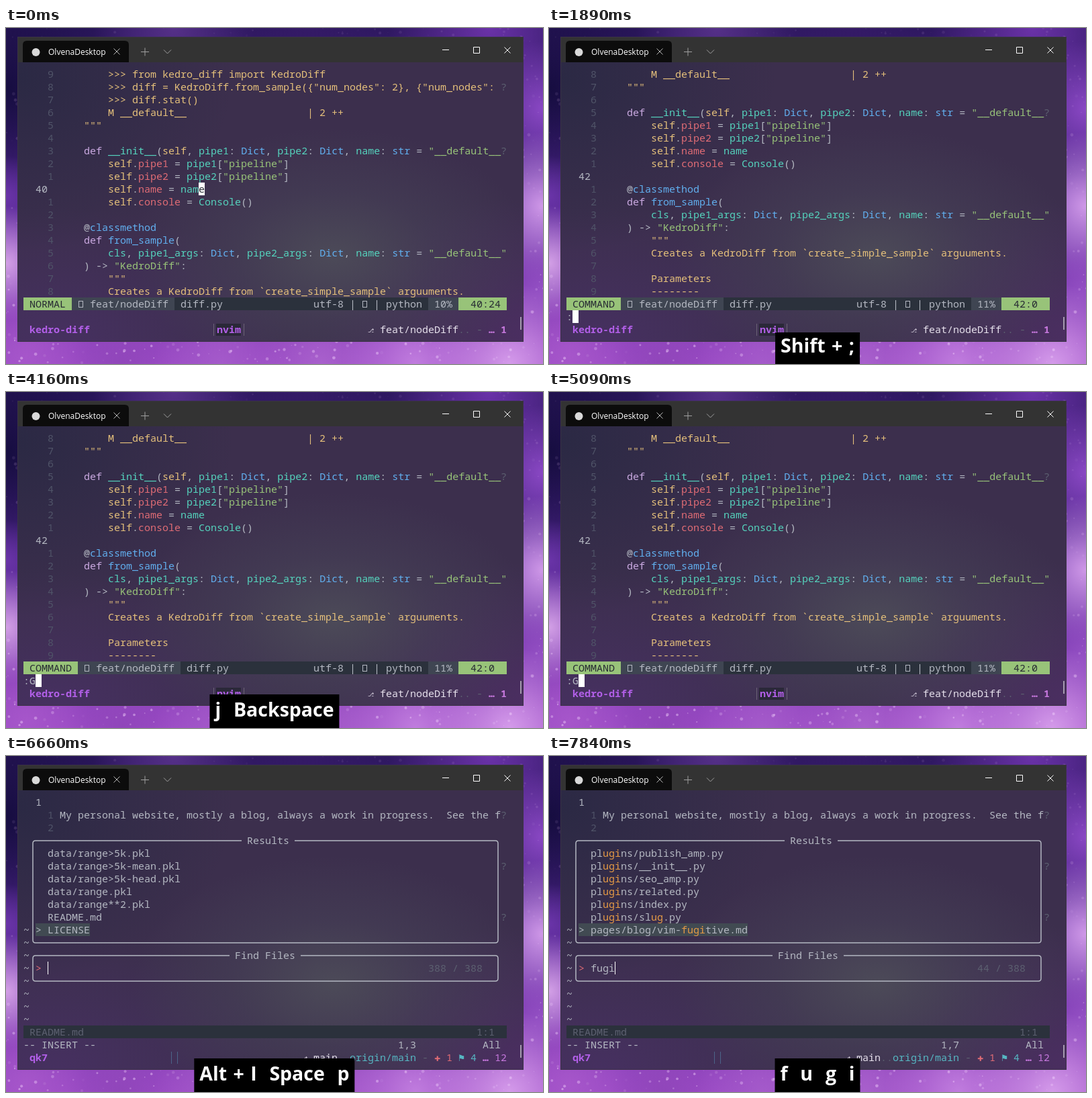
Animation of 800 by 500 pixels, one loop 8000 ms. Source, as an HTML page with a canvas:

```html
<!DOCTYPE html>
<html lang="en">
<head>
<meta charset="utf-8">
<title>Terminal session</title>
<style>
html, body { margin: 0; width: 100%; height: 100%; overflow: hidden; background: #241252; }
#stage { position: relative; width: 800px; height: 500px; overflow: hidden; }
#sky, #chrome { position: absolute; left: 0; top: 0; }
#window {
  position: absolute; left: 18px; top: 14px; width: 752px; height: 452px;
  box-shadow: 0 0 0 1px #3a3344;
  background:
    radial-gradient(ellipse 300px 190px at 470px 325px, #4c4a58 0%, #48445880 50%, transparent),
    radial-gradient(ellipse 320px 260px at 0 60px, #2b2944, transparent),
    radial-gradient(ellipse 300px 200px at 752px 440px, #4a2e60, transparent),
    radial-gradient(ellipse 340px 200px at 60px 452px, #463060, transparent),
    #3c2f4d;
}
#screen span, #screen i { position: absolute; }
#screen span {
  height: 19px; white-space: pre;
  font: 500 15px/19px "Noto Sans Mono", "DejaVu Sans Mono", monospace;
  font-variant-ligatures: none; color: #b4b8c2;
}
#screen b { font-weight: 500; }
#screen span.bold { font-weight: 700; }
#screen .y { color: #e5c07b; } #screen .g { color: #98c379; } #screen .r { color: #e06c75; }
#screen .t { color: #55d3bd; } #screen .u { color: #61afef; } #screen .l { color: #cbaae2; }
#screen .o { color: #e59a45; } #screen .dim { color: #5c6070; } #screen .num { color: #505468; }
#screen .p { color: #b25fe8; } #screen .m { color: #c678dd; } #screen .c { color: #56b6c2; }
#screen .w { color: #e6e0ec; } #screen .dark { color: #282c34; }
#screen .small { font-size: 8px; line-height: 22px; }
#keys {
  position: absolute; bottom: 0; left: 50%; transform: translateX(-50%);
  box-sizing: border-box; height: 47px; padding: 0 8px; overflow: hidden;
  background: #000; color: #fff; white-space: pre; word-spacing: 2px;
  font: 700 28.5px/38px "Open Sans", "Noto Sans", sans-serif;
}
#keys.tall { height: 50px; line-height: 44px; }
#keys:empty { display: none; }
</style>
</head>
<body>
<div id="stage">
  <canvas id="sky" width="800" height="500"></canvas>
  <div id="window"></div>
  <svg id="chrome" width="800" height="500" fill="none" stroke="#d0d0d0">
    <path d="M18 14H770V51H18Z" fill="#333333" stroke="none"/>
    <path d="M25 51V25Q25 19 31 19H177Q183 19 183 25V51Z" fill="#0c0c0c" stroke="none"/>
    <circle cx="44.500" cy="36" r="6" fill="#d9d9d9" stroke="none"/>
    <text x="63" y="40" fill="#fff" stroke="none" font-size="12" font-family="Open Sans, Noto Sans, sans-serif">OlvenaDesktop</text>
    <path d="M160.500 30.500l9 9m0-9l-9 9" stroke="#b8b8b8"/>
    <path d="M201 35.500h12m-6-6v12M235 32.500l5.500 5.500 5.500-5.500" stroke="#a0a0a0"/>
    <path d="M650 32.500h10M696.500 28.500h9v9h-9zM742.500 28.500l9 9m0-9l-9 9" stroke="#fff"/>
    <path d="M767 430V449" stroke="#a39aac" stroke-width="2"/>
  </svg>
  <div id="screen"></div>
  <div id="keys"></div>
</div>
<script>
const LOOP = 8000, CW = 9, RH = 19, X0 = 26, Y0 = 59;
const screenEl = document.getElementById('screen');
const keysEl = document.getElementById('keys');

// Soft nebula behind the window: x, y, radius, colour
function paintSky() {
  const g = document.getElementById('sky').getContext('2d');
  const base = g.createLinearGradient(0, 0, 0, 500);
  base.addColorStop(0, '#2e1860');
  base.addColorStop(.5, '#5b2a9c');
  base.addColorStop(1, '#9a4ac4');
  g.fillStyle = base;
  g.fillRect(0, 0, 800, 500);
  const clouds = [
    [0, 90, 210, '#160d40'], [250, 0, 120, '#553088'], [450, 0, 110, '#341a66'],
    [720, 0, 150, '#6a32a8'], [800, 120, 100, '#8a48c4'], [800, 265, 110, '#cf98e8'],
    [800, 390, 70, '#9450c4'], [0, 250, 60, '#6a34a8'], [0, 350, 85, '#d3a0e6'],
    [30, 490, 100, '#a656ca'], [170, 500, 80, '#9046ba'], [320, 500, 100, '#a45aca'],
    [470, 500, 100, '#a860cc'], [610, 500, 110, '#c07cde'], [750, 500, 120, '#d49aea']
  ];
  for (const [x, y, r, color] of clouds) {
    const blob = g.createRadialGradient(x, y, 0, x, y, r);
    blob.addColorStop(0, color);
    blob.addColorStop(1, color + '00');
    g.fillStyle = blob;
    g.fillRect(0, 0, 800, 500);
  }
  let seed = 7;
  const rnd = () => (seed = seed * 16807 % 2147483647) / 2147483647;
  for (let i = 0; i < 1500; i++) {
    const x = rnd() * 800, y = rnd() * 500;
    g.fillStyle = `rgba(240,205,250,${rnd() * (.1 + y / 1200)})`;
    g.beginPath();
    g.arc(x, y, .5 + rnd() * 2, 0, 7);
    g.fill();
  }
}

const FIRST = 31;
const SOURCE = `        >>> from kedro_diff import KedroDiff
        >>> diff = KedroDiff.from_sample({"num_nodes": 2}, {"num_nodes": 4})
        >>> diff.stat()
        M __default__                    | 2 ++
    """

    def __init__(self, pipe1: Dict, pipe2: Dict, name: str = "__default__"):
        self.pipe1 = pipe1["pipeline"]
        self.pipe2 = pipe2["pipeline"]
        self.name = name
        self.console = Console()

    @classmethod
    def from_sample(
        cls, pipe1_args: Dict, pipe2_args: Dict, name: str = "__default__"
    ) -> "KedroDiff":
        """
        Creates a KedroDiff from \`create_simple_sample\` arguuments.

        Parameters
        --------`.split('\n');

const README = ['',
  'My personal website, mostly a blog, always a work in progress.  See the full story', '',
  '## Setup', '',
  'Create a fresh environment, install the requirements, and then start the local server', '',
  '## Build', '',
  'Every push to the main branch builds all of the pages and then publishes the new site'];

const FILES = {
  '': ['data/range>5k.pkl', 'data/range>5k-mean.pkl', 'data/range>5k-head.pkl',
    'data/range.pkl', 'data/range**2.pkl', 'README.md', 'LICENSE'],
  f: ['pages/blog/refactor.md', 'pages/blog/find-files.md', 'pages/blog/fugitive.md',
    'static/fonts.css', 'static/favicon.ico', 'static/feed.xml', 'Pipfile'],
  fu: ['pages/blog/useful.md', 'pages/blog/functions.md', 'pages/blog/fuzzy.md',
    'pages/blog/full-text.md', 'pages/blog/vim-fu.md', 'plugins/slug.py', 'pages/blog/vim-fugitive.md'],
  fugi: ['plugins/publish_amp.py', 'plugins/__init__.py', 'plugins/seo_amp.py',
    'plugins/related.py', 'plugins/index.py', 'plugins/slug.py', 'pages/blog/vim-fugitive.md']
};
FILES.fug = FILES.fugi;
const COUNTS = { '': 388, f: 203, fu: 96, fug: 47, fugi: 44 };
const MATCH = { f: /f/g, fu: /fu/g, fug: /fug|ug/g, fugi: /fugi|ugi|ug/g };

const esc = s => s.replace(/&/g, '&amp;').replace(/</g, '&lt;');
const tag = (cls, s) => `<b class="${cls}">${esc(s)}</b>`;
const span = (col, row, html, cls = '') =>
  `<span class="${cls}" style="left:${X0 + col * CW}px;top:${Y0 + row * RH}px">${html}</span>`;
const put = (col, row, text, cls) => span(col, row, esc(text), cls);
const rect = (x, y, w, h, color) =>
  `<i style="left:${x}px;top:${y}px;width:${w}px;height:${h}px;background:${color}"></i>`;
const fill = (col, row, cols, color) => rect(X0 + col * CW, Y0 + row * RH, cols * CW, RH, color);
const tofu = (col, row) =>
  `<i style="left:${X0 + col * CW + 1}px;top:${Y0 + row * RH + 5}px;width:5px;height:8px;border:1px solid #b4b8c2"></i>`;

function highlight(code) {
  const token = /(?<g>"[^"]*"?)|\b(?<l>def)\b|\b(?<y>self)\b|(?<r>(?<=self\.)\w+)|\b(?<u>Dict|str|classmethod|from_sample)\b|(?<t>\w+)/g;
  let out = '', last = 0;
  for (const m of code.matchAll(token)) {
    const cls = Object.keys(m.groups).find(name => m.groups[name]);
    out += esc(code.slice(last, m.index)) + tag(cls, m[0]);
    last = m.index + m[0].length;
  }
  return out + esc(code.slice(last));
}

// Lines too long for the 74 text columns end in a marker.
const clip = line => line.length > 74 ? line.slice(0, 73) : line;
const overflow = (row, line) => line.length > 74 ? put(79, row, '?', 'dim') : '';

let inDoc = true;
const CODE = SOURCE.map(line => {
  const quotes = line.includes('"""');
  const html = inDoc || quotes ? tag('y', clip(line)) : highlight(clip(line));
  if (quotes) inDoc = !inDoc;
  return html;
});

function gutter(row, current, number) {
  return row === current
    ? put(2, row, String(number))
    : put(4, row, String(Math.abs(row - current)), 'num');
}

function codeRows(s) {
  let out = '';
  for (let row = 0; row < 18; row++) {
    const index = row + s.scroll;
    out += gutter(row, s.line - FIRST - s.scroll, s.line) +
      span(6, row, CODE[index]) + overflow(row, SOURCE[index]);
  }
  return out;
}

function readmeRows(covered) {
  let out = '';
  for (let row = 0; row < 18; row++) {
    if (row >= README.length) { out += put(0, row, '~'); continue; }
    out += overflow(row, README[row]);
    if (!covered || row < 3) out += gutter(row, 0, 1) + put(6, row, clip(README[row]));
  }
  return out;
}

function statusLine(mode, branch, file, type, percent, pos) {
  const a = mode.length + 2, b = branch.length + 4;
  return fill(0, 18, 80, '#2b313c') + fill(0, 18, a, '#98c379') + fill(a, 18, b, '#3f4552') +
    fill(67, 18, 5, '#3f4552') + fill(72, 18, 8, '#98c379') +
    put(1, 18, mode, 'dark') + tofu(a + 1, 18) + put(a + 3, 18, branch) + put(a + b + 1, 18, file) +
    put(67 - type.length - 13, 18, 'utf-8 |') + tofu(67 - type.length - 5, 18) +
    put(67 - type.length - 3, 18, '| ' + type) + put(68, 18, percent) + put(74, 18, pos, 'dark');
}

const bars = (color, ...cols) =>
  cols.map(c => rect(X0 + c * CW + 4, 440, 1, 18, color)).join('');

function tmuxLine(s) {
  let out = put(1, 20, s.blog ? 'qk7' : 'kedro-diff', 'p bold');
  if (!s.blog) {
    out += bars('#6b6376', 31, 36) + rect(313, 440, 37, 18, '#2a2838') + put(32, 20, 'nvim', 'p bold');
  } else {
    out += s.tmux ? bars('#4c6488', 24, 25) : bars('#4c6488', 30, 31);
  }
  if (!s.tmux) {
    return out + put(57, 20, '⎇', 'w small') + put(59, 20, 'feat/nodeDiff', 'w') +
      put(72, 20, '.. -', 'dim') + put(77, 20, '…', 'm bold') + put(79, 20, '1', 'm bold');
  }
  return out + put(46, 20, '⎇', 'w small') + put(48, 20, 'main', 'w') + put(52, 20, '..', 'dim') +
    put(54, 20, 'origin/main', 'c') + put(66, 20, '-', 'dim') +
    put(68, 20, '✚', 'r') + put(70, 20, '1', 'r') + put(72, 20, '⚑', 'c') +
    put(74, 20, '4', 'c') + put(76, 20, '…', 'm bold') + put(78, 20, '12', 'm');
}

function frame(top, bottom, gapStart, gapEnd) {
  return `M${gapStart} ${top}H44Q40 ${top} 40 ${top + 4}V${bottom - 4}Q40 ${bottom} 44 ${bottom}` +
    `H729Q733 ${bottom} 733 ${bottom - 4}V${top + 4}Q733 ${top} 729 ${top}H${gapEnd}`;
}

function finder(s) {
  let out = '<svg width="800" height="500" style="position:absolute;left:0;top:0" fill="none" ' +
    `stroke="#b4b8c2" stroke-width="1.500"><path d="${frame(126, 278, 351, 430)}${frame(297, 335, 333, 439)}"/></svg>` +
    put(37, 3, 'Results') + put(35, 12, 'Find Files');
  const files = s.listed === undefined ? [] : FILES[s.listed];
  files.forEach((name, i) => {
    const row = 4 + i;
    if (i === 6) out += fill(2, row, name.length + 2, '#414a52') + put(2, row, '>');
    const html = s.listed ? esc(name).replace(MATCH[s.listed], m => tag('o', m)) : esc(name);
    out += span(4, row, html);
  });
  const count = s.listed === undefined ? '0 / 0' : COUNTS[s.listed] + ' / 388';
  return out + put(2, 13, '>', 'r') + put(4, 13, s.query) +
    rect(X0 + (4 + s.query.length) * CW, 306, 1, 19, '#fff') +
    put(76 - count.length, 13, count, 'dim') +
    fill(0, 18, 80, '#2b313c') + put(1, 18, 'README.md', 'dim') + put(75, 18, '1:1', 'dim') +
    put(0, 19, '-- INSERT --') + put(62, 19, '1,' + (3 + s.query.length)) + put(76, 19, 'All');
}

function blockCursor(col, row, char = '') {
  return fill(col, row, 1, '#fff') + put(col, row, char, 'dark');
}

function draw(s) {
  const finding = s.query !== undefined;
  let out = s.blog ? readmeRows(finding) : codeRows(s);
  if (finding) {
    out += finder(s);
  } else if (s.blog) {
    out += blockCursor(6, 0) + statusLine('NORMAL', 'main', 'README.md', 'markdown', '10%', '1:1') +
      put(69, 19, s.pending || '');
  } else {
    const command = s.cmd !== undefined;
    out += statusLine(command ? 'COMMAND' : 'NORMAL', 'feat/nodeDiff', 'diff.py', 'python', s.percent, s.pos);
    out += command
      ? put(0, 19, s.cmd) + blockCursor(s.cmd.length, 19)
      : blockCursor(s.col, s.line - FIRST - s.scroll, s.char);
  }
  screenEl.innerHTML = out + tmuxLine(s);
  keysEl.textContent = s.keys;
  keysEl.classList.toggle('tall', /[jgp]/.test(s.keys));
}

// Each step changes part of the state from its time on.
const STEPS = [
  [0, { line: 40, scroll: 0, col: 29, char: 'e', percent: '10%', pos: '40:24', keys: '' }],
  [500, { line: 41, scroll: 1, char: 'C', pos: '41:24', keys: 'j' }],
  [670, { line: 42, scroll: 2, col: 6, char: '', percent: '11%', pos: '42:0' }],
  [820, { line: 43, scroll: 3, col: 21, char: 'd', pos: '43:16' }],
  [970, { line: 42, col: 6, char: '', pos: '42:0', keys: 'j  k' }],
  [1660, { cmd: ':' }],
  [1740, { keys: 'k  Shift + ;' }],
  [1890, { keys: 'Shift + ;' }],
  [2600, { cmd: ':G', keys: 'Shift + ;  Shift + G' }],
  [2700, { keys: 'Shift + G' }],
  [3460, { cmd: ':Gj', keys: 'Shift + G  j' }],
  [3530, { keys: 'j' }],
  [4160, { cmd: ':G', keys: 'j  Backspace' }],
  [4410, { keys: 'Backspace' }],
  [5090, { keys: '' }],
  [5870, { blog: true, keys: 'Alt + I' }],
  [6040, { tmux: true }],
  [6420, { pending: '<20>', keys: 'Alt + I  Space' }],
  [6570, { query: '', keys: 'Alt + I  Space  p' }],
  [6660, { listed: '' }],
  [6810, { keys: 'Space  p' }],
  [7360, { query: 'f', keys: 'p  f' }],
  [7440, { listed: 'f' }],
  [7520, { query: 'fu', keys: 'f  u' }],
  [7600, { listed: 'fu' }],
  [7680, { query: 'fug', keys: 'f  u  g' }],
  [7760, { query: 'fugi', listed: 'fug', keys: 'f  u  g  i' }],
  [7840, { listed: 'fugi' }]
];

const start = performance.now();
let shown = -1;
function tick() {
  const t = (performance.now() - start) % LOOP;
  const past = STEPS.filter(([at]) => at <= t);
  if (past.length !== shown) {
    shown = past.length;
    draw(Object.assign({}, ...past.map(([, change]) => change)));
  }
  requestAnimationFrame(tick);
}

paintSky();
tick();
</script>
</body>
</html>
```
